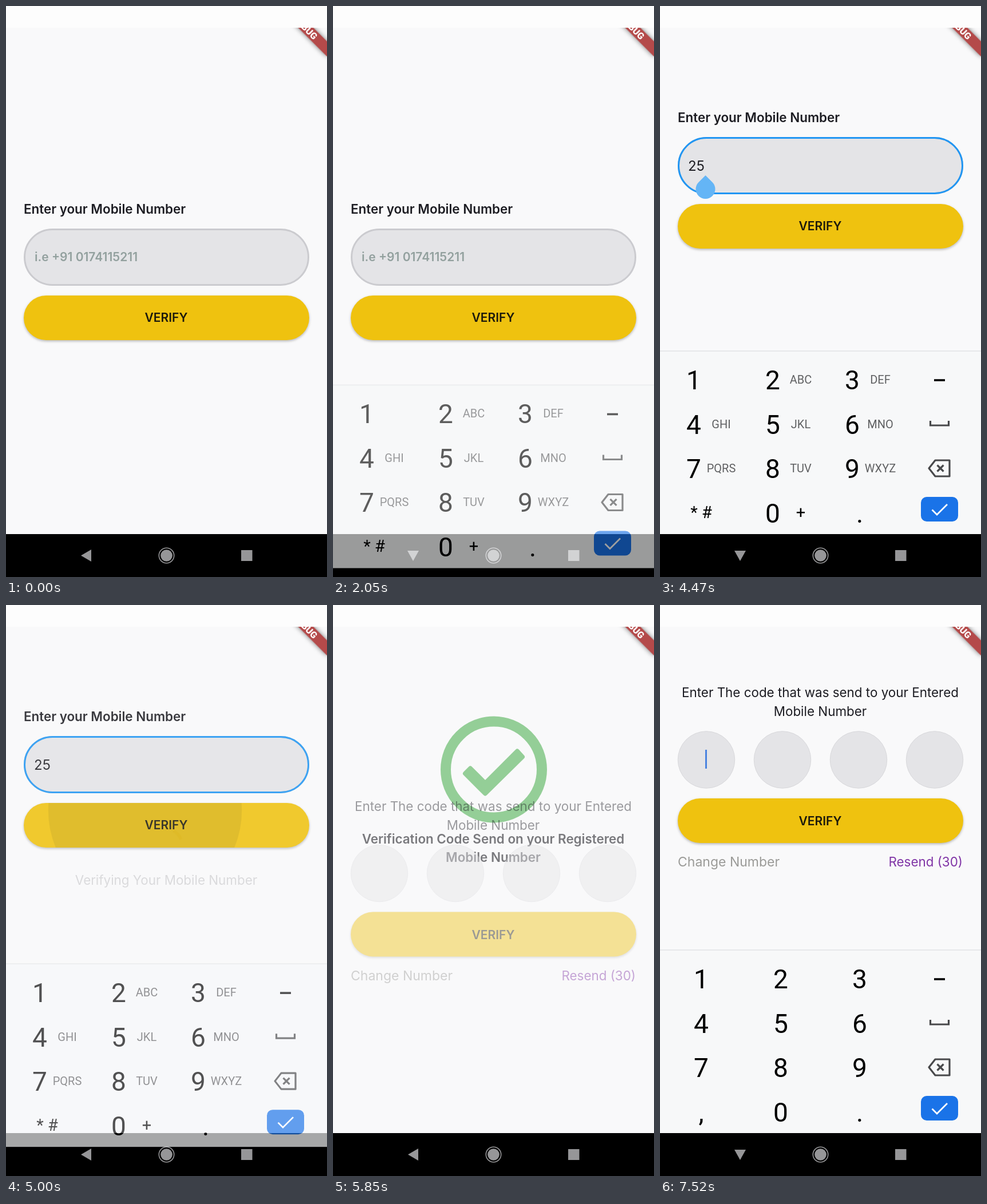
These frames come from a looping animation (561x998 px, 8 s). An HTML page:

```html
<!DOCTYPE html>
<html lang="en">
<head>
<meta charset="utf-8">
<title>Mobile verification</title>
<style>
  html, body { margin: 0; width: 100%; height: 100%; overflow: hidden; background: #f9f9fa; }
  svg { display: block; width: 100%; height: 100%; }
  text { font: 400 22.4px Inter, sans-serif; fill: #1c1c22; }
  .mid { text-anchor: middle; }
  .end { text-anchor: end; }
  .bold { font-weight: 600; }
  .verify { font-size: 21px; font-weight: 600; fill: #1d1a0c; }
  .digit { font: 400 46px Roboto, sans-serif; fill: #000; }
  .sign { font: 400 29px Roboto, sans-serif; fill: #000; }
  .letters { font: 400 20px Roboto, sans-serif; fill: #5f6062; }
  .icon { fill: none; stroke: #48494b; stroke-width: 3.2; }
  .cursor { fill: #4a83e0; }
  .button { fill: #efc20f; filter: drop-shadow(0 2px 2px #0004); }
</style>
</head>
<body>
<svg viewBox="0 0 561 998">
  <defs>
    <clipPath id="buttonClip"><rect x="31" y="506" width="499" height="78" rx="39"/></clipPath>
  </defs>
  <rect width="561" height="998" fill="#f9f9fa"/>

  <g id="numberPage">
    <text class="bold" x="31" y="363">Enter your Mobile Number</text>
    <rect x="32.5" y="390.5" width="496" height="97" rx="48.5" fill="#e4e4e7" stroke="#cbcbcf" stroke-width="3"/>
    <rect id="focusRing" x="32.5" y="390.5" width="496" height="97" rx="48.5" fill="none" stroke="#2196f3" stroke-width="3"/>
    <text id="hint" class="bold" x="50" y="446" style="font-size:21px;fill:#92a09e">i.e +91 0174115211</text>
    <text id="entry" x="49" y="448" style="font-size:24px"></text>
    <rect id="entryCursor" class="cursor" y="421" width="3" height="33"/>
    <rect class="button" x="31" y="506" width="499" height="78" rx="39"/>
    <circle id="ripple" cx="243" cy="519" fill="#000" opacity=".075" clip-path="url(#buttonClip)"/>
    <text class="verify mid" x="280" y="552">VERIFY</text>
    <path id="handle" d="M79.5 456l12 12a17 17 0 1 1-24 0z" fill="#64b5f6"/>
  </g>

  <g id="waitPage">
    <path id="spinner" d="M-10-24A26 26 0 0 1 10-24" fill="none" stroke="#d9ad00" stroke-width="5"/>
    <text class="mid" x="280" y="513">Verifying Your Mobile Number</text>
  </g>

  <g id="donePage">
    <circle cx="281" cy="429" r="84" fill="none" stroke="#4caf50" stroke-width="18"/>
    <path d="M240 427l26 26 56-56 9 10-65 64-35-35z" fill="#4caf50" stroke="#4caf50" stroke-width="8" stroke-linejoin="round"/>
    <text class="mid bold" x="280" y="558">Verification Code Send on your Registered</text>
    <text class="mid bold" x="280" y="590">Mobile Number</text>
  </g>

  <g id="codePage">
    <text class="mid" x="280" y="321">Enter The code that was send to your Entered</text>
    <text class="mid" x="280" y="354">Mobile Number</text>
    <g id="codeCells" fill="#e4e4e7" stroke="#d8d8db"></g>
    <rect id="codeCursor" class="cursor" x="79" y="413" width="3" height="33"/>
    <rect class="button" x="31" y="498" width="499" height="78" rx="39"/>
    <text class="verify mid" x="280" y="545">VERIFY</text>
    <text x="31" y="617" style="font-size:23px;fill:#9b9b98">Change Number</text>
    <text class="end" x="529" y="617" style="fill:#8035a6">Resend (30)</text>
  </g>

  <g transform="translate(523.5 37.5) rotate(45)">
    <rect x="-62" y="-9.3" width="124" height="18.7" fill="#b44a4a" style="filter:drop-shadow(0 0 4px #0008)"/>
    <text class="mid" y="5.8" style="font:900 16px Roboto,sans-serif;fill:#fff">DEBUG</text>
  </g>
  <rect width="561" height="38" fill="#fdfdfd"/>

  <rect y="923" width="561" height="75"/>
  <g fill="#969698">
    <path id="navBack"/>
    <circle cx="280.5" cy="960.5" r="13.2" fill="none" stroke="#969698" stroke-width="1.6"/>
    <circle cx="280.5" cy="960.5" r="10.3"/>
    <rect x="411" y="951" width="19.5" height="19"/>
  </g>

  <g id="phoneKeys"></g>
  <g id="digitKeys"></g>
</svg>

<script>
const LOOP = 8000;
const KEYBOARD_LIFT = 160;
const FADE_TO_WAIT = [4965, 270], FADE_TO_DONE = [5200, 210], FADE_TO_CODE = [5720, 310];

const el = id => document.getElementById(id);
const clamp = v => Math.min(1, Math.max(0, v));
const ramp = (t, start, length) => clamp((t - start) / length);
const smooth = v => v * v * (3 - 2 * v);
const between = (t, a, b) => t >= a && t < b;
// Pages slide faster than they fade, after a short delay.
const slide = p => smooth(clamp((p - .13) / .417));

function show(node, opacity) {
  node.style.display = opacity > 0 ? '' : 'none';
  node.setAttribute('opacity', opacity);
}

function place(id, opacity, y) {
  show(el(id), opacity);
  el(id).setAttribute('transform', `translate(0 ${y.toFixed(2)})`);
}

const label = (cls, x, y, s) => `<text class="${cls} mid" x="${x}" y="${y}">${s}</text>`;

function keyboard(columns, letters, lastRow) {
  let out = `<rect y="603" width="561" height="320" fill="#f7f8f9"/>
    <rect y="602" width="561" height="2" fill="#e7e8ea"/>`;
  for (let i = 0; i < 9; i++) {
    const col = i % 3, y = 670 + Math.floor(i / 3) * 77.5;
    out += label('digit', columns[col], y, i + 1);
    if (letters[i]) out += label('letters', 107 + col * 139, y - 10, letters[i]);
  }
  return out + lastRow + label('digit', columns[1], 903, 0) + label('digit', 349, 903, '.') +
    `<path class="icon" style="stroke:#000;stroke-width:3.6" d="M479 654h19"/>
    <path class="icon" d="M472.5 725v8h32v-8"/>
    <path class="icon" stroke-linejoin="round" d="M481 794h25v28h-25l-11-14zM484.500 802.500l11 11m0-11l-11 11"/>
    <rect x="456" y="858" width="65" height="43" rx="10" fill="#1a73e8"/>
    <path d="M475.500 880.500l8.500 8.500 18-18" fill="none" stroke="#fff" stroke-width="2.800"/>`;
}

el('phoneKeys').innerHTML = keyboard([59, 197, 336],
  ['', 'ABC', 'DEF', 'GHI', 'JKL', 'MNO', 'PQRS', 'TUV', 'WXYZ'],
  label('sign', 72, 895, '* #') + label('sign', 246, 895, '+'));
el('digitKeys').innerHTML = keyboard([72, 211, 349], [], label('digit', 72, 903, ','));
el('codeCells').innerHTML = [81, 214, 347, 480]
  .map(x => `<circle cx="${x}" cy="430.5" r="49.7"/>`).join('');

function drawKeyboard(id, t, open, close) {
  const enter = 1 - (1 - ramp(t, open, 230)) ** 2;
  const leave = ramp(t, close, 230);
  const visible = t >= open && leave < 1;
  place(id, visible ? (.62 + .38 * enter) * (1 - .82 * leave) : 0, 60 * (1 - enter) + 61 * leave);
}

function drawEntry(t) {
  show(el('focusRing'), ramp(t, 2060, 200));
  show(el('hint'), 1 - ramp(t, 3150, 200));
  el('entry').textContent = t < 3160 ? '' : t < 3930 ? '2' : '25';
  el('entryCursor').setAttribute('x', t < 3160 ? 48 : t < 3930 ? 64 : 80);
  show(el('entryCursor'), +(between(t, 2090, 2900) || between(t, 3160, 4070)));
  show(el('handle'), t < 4740 ? ramp(t, 4030, 200) : 0);
  el('ripple').setAttribute('r', 168.5 * Math.max(0, (t - 4740) / 260));
}

function draw(t) {
  const lift = between(t, 2090, 5040) || t >= 7330 ? -KEYBOARD_LIFT : 0;
  const wait = ramp(t, ...FADE_TO_WAIT);
  const done = ramp(t, ...FADE_TO_DONE);
  const code = ramp(t, ...FADE_TO_CODE);

  place('numberPage', 1 - wait, lift - 180 * slide(wait));
  place('waitPage', wait * (1 - done), lift + 136 * (1 - slide(wait)) - 180 * slide(done));
  place('donePage', done * (1 - code), lift + 180 * (1 - slide(done)) - 180 * slide(code));
  place('codePage', code, lift + 180 * (1 - slide(code)));

  drawEntry(t);
  el('spinner').setAttribute('transform', `translate(281 442) rotate(${48 + (t - 5000) * .36})`);
  show(el('codeCursor'), +(t >= 7380));

  const navDown = between(t, 2000, 4910) || t >= 7200;
  el('navBack').setAttribute('d', navDown ? 'M130 952h20l-10 18z' : 'M131 960.500l18-10.500v21z');
  drawKeyboard('phoneKeys', t, 2050, 4910);
  drawKeyboard('digitKeys', t, 7290, LOOP);
}

function tick() {
  draw(performance.now() % LOOP);
  requestAnimationFrame(tick);
}
tick();
</script>
</body>
</html>
```
